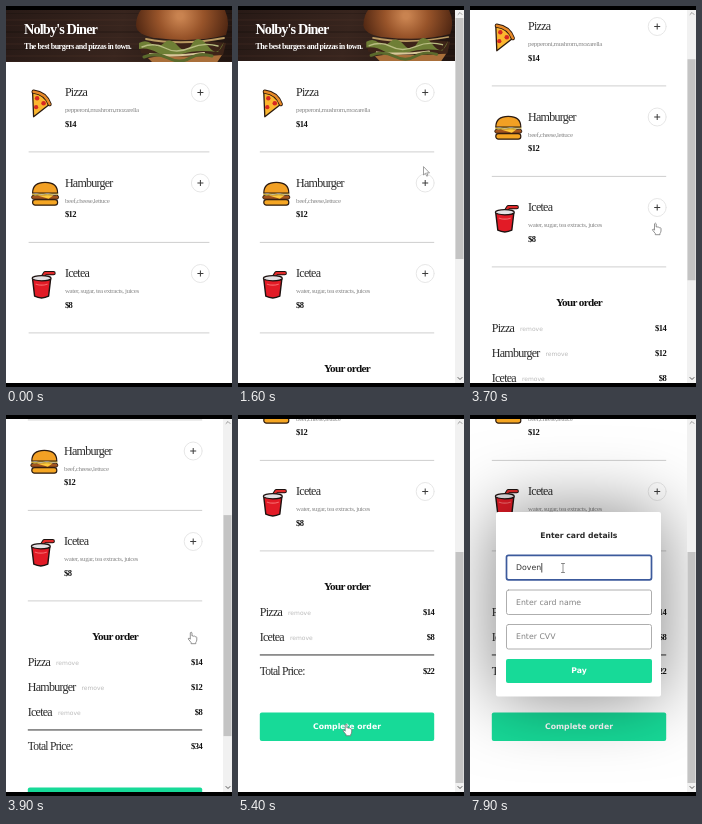
These frames come from a looping animation (226x381 px, 8 s). An HTML page with a canvas:

```html
<!DOCTYPE html>
<html lang="en">
<head>
<meta charset="utf-8">
<title>Diner order</title>
<style>
  html, body { margin: 0; width: 100%; height: 100%; overflow: hidden; background: #000; }
  canvas { display: block; width: 226px; height: 381px; }
</style>
</head>
<body>
<canvas id="stage"></canvas>
<script>
const W = 226, H = 381, LOOP = 8000, TOP = 4, BOTTOM = 377;
const SERIF = '"Liberation Serif", serif';
const SANS = '"DejaVu Sans", sans-serif';
const GREEN = '#17da98', INK = '#2a2a2a', OUTLINE = '#2b1a10';

const canvas = document.getElementById('stage');
const ctx = canvas.getContext('2d');
const dpr = window.devicePixelRatio || 1;
canvas.width = W * dpr;
canvas.height = H * dpr;

const MENU = [
  { name: 'Pizza', about: 'pepperoni,mushrom,mozarella', price: 14, icon: drawPizza, added: 800, removed: Infinity },
  { name: 'Hamburger', about: 'beef,cheese,lettuce', price: 12, icon: drawHamburger, added: 1900, removed: 4800 },
  { name: 'Icetea', about: 'water, sugar, tea extracts, juices', price: 8, icon: drawCup, added: 3300, removed: Infinity }
];
const SCROLL = [[2000, 0], [2400, 35], [3400, 35], [3700, 66], [4100, 216]];
const CURSOR_X = [[100, 232], [600, 193], [1000, 188], [1600, 185.5], [2100, 187], [2400, 190], [3000, 186],
  [4100, 185], [4500, 84], [4900, 84], [5400, 108], [5800, 108], [6300, 93]];
const CURSOR_Y = [[100, 150], [600, 86], [1000, 86], [1600, 161], [1800, 175], [2100, 175], [2400, 174],
  [3000, 228], [3400, 228], [3700, 217], [4100, 217], [4500, 196], [4900, 196], [5400, 309], [5800, 309], [6300, 153]];
const CURSOR_KIND = [[0, 'arrow'], [600, 'hand'], [1200, 'arrow'], [1700, 'hand'], [4200, 'arrow'],
  [4500, 'hand'], [5000, 'arrow'], [5300, 'hand'], [5600, 'arrow'], [6200, 'beam']];
const MODAL_AT = 5600, FOCUS_AT = 6200;
const TYPED = 'Doven', TYPE_AT = 6900, KEY_GAP = 200;

function track(keys, t) {
  if (t <= keys[0][0]) return keys[0][1];
  for (let i = 1; i < keys.length; i++) {
    const [t1, b] = keys[i], [t0, a] = keys[i - 1];
    if (t < t1) {
      const p = (t - t0) / (t1 - t0);
      return a + (b - a) * p * p * (3 - 2 * p);
    }
  }
  return keys[keys.length - 1][1];
}

function text(str, x, y, size, { family = SERIF, weight = 400, color = INK, align = 'left' } = {}) {
  ctx.font = `${weight} ${size}px ${family}`;
  ctx.letterSpacing = family === SERIF ? `${-size / 16}px` : '0px';
  ctx.textAlign = align;
  ctx.textBaseline = 'middle';
  ctx.fillStyle = color;
  ctx.fillText(str, x, y);
}

function rect(x, y, w, h, color) {
  ctx.fillStyle = color;
  ctx.fillRect(x, y, w, h);
}

function rounded(x, y, w, h, r, fill, stroke, line = 1) {
  ctx.beginPath();
  ctx.roundRect(x, y, w, h, r);
  paint(fill, stroke, line);
}

function ellipse(x, y, rx, ry, fill, stroke, line) {
  ctx.beginPath();
  ctx.ellipse(x, y, rx, ry, 0, 0, Math.PI * 2);
  paint(fill, stroke, line);
}

function shape(d, fill, stroke, line) {
  paint(fill, stroke, line, new Path2D(d));
}

function paint(fill, stroke, line = 1, path) {
  ctx.lineJoin = ctx.lineCap = 'round';
  if (fill) {
    ctx.fillStyle = fill;
    path ? ctx.fill(path) : ctx.fill();
  }
  if (stroke) {
    ctx.strokeStyle = stroke;
    ctx.lineWidth = line;
    path ? ctx.stroke(path) : ctx.stroke();
  }
}

function at(x, y, draw) {
  ctx.save();
  ctx.translate(x, y);
  draw();
  ctx.restore();
}

// Icons: the origin is the left edge of the column, level with the dish name.
function drawPizza() {
  shape('M4 0 Q16 2 21 12 L5 24.5 Z', '#fbb62f', OUTLINE, 1.3);
  shape('M5 -.5 Q17 1 21 12', null, OUTLINE, 4.2);
  shape('M5 -.5 Q17 1 21 12', null, '#e98a28', 2.4);
  for (const [x, y, r] of [[8.5, 6, 2.2], [15, 11, 2.3], [7.5, 15, 2.1]]) ellipse(x, y, r, r, '#d62822');
}

function drawHamburger() {
  rounded(4, 17, 25, 5.5, 2.6, '#f5a623', OUTLINE, 1.2);
  rounded(3, 12.5, 27, 4, 2, '#a3541d', OUTLINE, 0.9);
  shape('M4 11.3 Q7 13 10 11.5 T16 11.5 T22 11.5 T29 11.3', null, '#c8a93a', 1.5);
  shape('M8 12.5 H25 L20 16 Z', '#ffc93a');
  shape('M4 10.3 Q4 -.4 16.5 -.4 Q29 -.4 29 10.3 Z', '#f2a024', OUTLINE, 1.2);
}

function drawCup() {
  shape('M14 4 L16.5 0 L25 0', null, '#1d1210', 4.2);
  shape('M14 4 L16.5 0 L25 0', null, '#e02a2a', 2.2);
  shape('M4 6 L22 6 L20 23 Q13 26.5 6 23 Z', '#e21b26', '#1d1210', 1.4);
  ellipse(13, 5, 9.5, 2.6, '#e4e2e4', '#1d1210', 1.2);
  shape('M7.5 11 Q13 13 18.5 11', null, '#f4686a', 1.2);
}

function drawHeader(w) {
  const h = Math.round(w * 0.232);
  ctx.save();
  ctx.beginPath();
  ctx.rect(0, 0, w, h);
  ctx.clip();
  const wood = ctx.createLinearGradient(0, 0, w, h);
  wood.addColorStop(0, '#281a16');
  wood.addColorStop(0.5, '#38251e');
  wood.addColorStop(1, '#201410');
  rect(0, 0, w, h, wood);
  for (let i = 0; i < 9; i++) {
    rect(0, 3 + i * 6, w, 1 + i % 2, i % 3 ? 'rgba(105,68,50,.1)' : 'rgba(0,0,0,.16)');
  }
  ctx.scale(w / W, w / W);

  shape('M142 48 Q172 42 216 45 L210 54 H148 Z', '#a96f3a');
  shape('M133 33 Q172 27 220 33 L217 45 Q170 49 135 43 Z', '#3d2418');
  const bun = ctx.createRadialGradient(174, 6, 3, 176, 4, 52);
  bun.addColorStop(0, '#c98350');
  bun.addColorStop(0.4, '#98542a');
  bun.addColorStop(1, '#45200f');
  shape('M130 15 Q131 -5 150 -8 H214 Q226 8 220 25 Q190 33 150 28 Q130 25 130 15 Z', bun);
  shape('M140 29 Q176 36 218 28', null, '#b99a62', 1.8);
  shape('M133 33 Q140 29 146 34 T158 33 T172 36 T186 34 T202 36 T218 32 L212 42 Q190 39 176 44 T152 43 T133 39 Z', '#6f7f36');
  shape('M136 37 Q148 32 159 38 T184 38 T212 36', null, '#b9bd82', 1.4);
  shape('M144 44 Q166 47 198 43', null, '#d8c79a', 2.2);
  shape('M138 47 Q150 42 162 48 T184 48 T206 46', null, '#5b6a2c', 3);
  ctx.restore();

  const white = { weight: 700, color: '#fff' };
  text("Nolby's Diner", w * 0.08, 20, 14.3, white);
  text('The best burgers and pizzas in town.', w * 0.08, 36.8, 8, white);
}

function drawMenu(w) {
  const left = w * 0.1, right = w * 0.9;
  MENU.forEach((dish, i) => {
    const y = 82.2 + i * 90.5;
    at(left, y, dish.icon);
    text(dish.name, left + 36.3, y + 1, 12);
    text(dish.about, left + 36.3, y + 18, 7, { color: '#8a8a8a' });
    text('$' + dish.price, left + 36.3, y + 32.3, 8.5, { weight: 700, color: '#111' });
    const px = right - 9, py = y + 0.3;
    ellipse(px, py, 9, 9, '#fff', '#e4e4e4', 0.9);
    rect(px - 3, py - 0.5, 6, 1, '#3c3c3c');
    rect(px - 0.5, py - 3, 1, 6, '#3c3c3c');
    rect(left, y + 59.2, right - left, 1, '#cfcfcf');
  });
}

function drawOrder(w, order) {
  if (!order.length) return;
  const left = w * 0.1, right = w * 0.9;
  const bold = { weight: 700, color: '#111', align: 'right' };
  text('Your order', w / 2, 358.9, 11.2, { ...bold, align: 'center' });
  order.forEach((dish, i) => {
    const y = 384.8 + i * 25;
    text(dish.name, left, y, 12);
    const end = left + ctx.measureText(dish.name).width;
    text('remove', end + 6, y + 0.9, 6, { family: SANS, color: '#bbb' });
    text('$' + dish.price, right, y, 8.5, bold);
  });
  const y = 376 + order.length * 25;
  rect(left, y, right - left, 1.8, '#8c8c8c');
  text('Total Price:', left, y + 18, 11.6);
  text('$' + order.reduce((sum, dish) => sum + dish.price, 0), right, y + 18, 8.5, bold);
  rounded(left, y + 58.5, right - left, 28.5, 2, GREEN);
  text('Complete order', w / 2, y + 73, 7.75, { family: SANS, weight: 700, color: '#fff', align: 'center' });
}

function drawScrollbar(count, scroll, max) {
  rect(217, TOP, 9, BOTTOM - TOP, '#f1f1f1');
  const h = 251 - 10 * count;
  rect(217.5, 12 + (356 - h) * scroll / max, 8, h, '#c4c4c4');
  shape('M220 8.5 L222 6.5 L224 8.5', null, '#999', 1);
  shape('M220 371.5 L222 373.5 L224 371.5', null, '#555', 1);
}

function drawField(y, value, color, focused) {
  rounded(36.5, y, 145, 24.5, 2, '#fff', focused ? '#3c5a9c' : '#a5a5a5', focused ? 1.7 : 0.9);
  text(value, 46, y + 12.6, 7.8, { family: SANS, color });
}

function drawModal(t) {
  ctx.save();
  ctx.shadowColor = 'rgba(0,0,0,.5)';
  ctx.shadowBlur = 72 * dpr;
  rounded(26, 97, 165, 184.5, 2, '#fff');
  ctx.restore();

  const center = { family: SANS, weight: 700, align: 'center' };
  text('Enter card details', 108.8, 121, 7.7, center);
  const typed = TYPED.slice(0, Math.max(0, Math.floor((t - TYPE_AT) / KEY_GAP) + 1));
  const focused = t >= FOCUS_AT;
  drawField(140.3, typed || 'Enter your name', typed ? '#333' : '#828282', focused);
  if (focused) {
    const caret = 46 + (typed ? ctx.measureText(typed).width + 0.3 : 0);
    rect(caret, 148, 0.8, 9.5, '#222');
  }
  drawField(175, 'Enter card name', '#828282');
  drawField(209.5, 'Enter CVV', '#828282');
  rounded(36, 244, 146, 24, 2, GREEN);
  text('Pay', 109, 256, 7.75, { ...center, color: '#fff' });
}

const CURSORS = {
  arrow: () => shape('M0 0 V8 L1.9 6.3 L3.2 9.2 L4.5 8.6 L3.2 5.9 H5.6 Z', '#fff', '#777', 0.7),
  hand: () => shape('M-.8 6 V.8 Q0 -.6 .9 .8 V4 Q2 3.3 2.6 4.3 Q3.6 3.7 4.2 4.7 Q5.4 4.3 5.7 5.6 V8 Q5.5 9.5 4.7 10.5 V11.7 H0 V10.5 L-2.9 6.9 Q-2.7 5 -.8 6.8 Z', '#fff', '#666', 0.7),
  beam: () => shape('M-1.6 -4.5 H1.6 M0 -4.5 V4.5 M-1.6 4.5 H1.6', null, '#666', 0.7)
};

function drawCursor(t) {
  const kind = CURSOR_KIND.filter(([start]) => t >= start).pop()[1];
  at(track(CURSOR_X, t), track(CURSOR_Y, t), CURSORS[kind]);
}

function render(t) {
  const order = MENU.filter(dish => t >= dish.added && t < dish.removed);
  const w = order.length ? 218 : W;
  const max = 141 + 25 * order.length;
  const scroll = Math.min(track(SCROLL, t), max);

  ctx.setTransform(dpr, 0, 0, dpr, 0, 0);
  rect(0, 0, W, H, '#000');
  ctx.save();
  ctx.beginPath();
  ctx.rect(0, TOP, W, BOTTOM - TOP);
  ctx.clip();
  rect(0, TOP, W, BOTTOM - TOP, '#fff');
  at(0, TOP - scroll, () => {
    drawHeader(w);
    drawMenu(w);
    drawOrder(w, order);
  });
  if (t >= MODAL_AT) drawModal(t);
  if (order.length) drawScrollbar(order.length, scroll, max);
  drawCursor(t);
  ctx.restore();
}

const start = performance.now();
function tick() {
  const t = (performance.now() - start) % LOOP;
  render(Math.floor(t / 100) * 100);
  requestAnimationFrame(tick);
}
tick();
</script>
</body>
</html>
```
